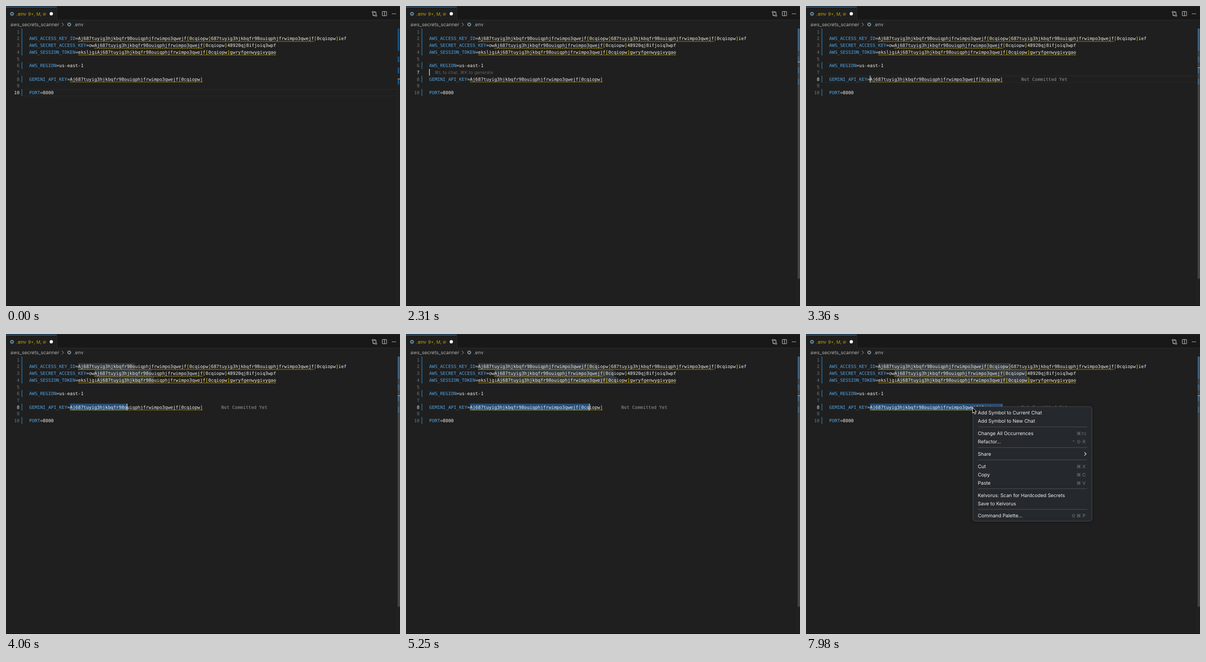
An HTML page for the animation above (8 s loop, 857 px wide and 653 px high).

```html
<!DOCTYPE html>
<html lang="en">
<head>
<meta charset="utf-8">
<title>Editor</title>
<style>
html, body { margin: 0; width: 100%; height: 100%; overflow: hidden; background: #1f1f1f; }
svg { display: block; width: 857px; height: 653px; }
text { white-space: pre; text-rendering: geometricPrecision; }
.mono { font: 9.8px "DejaVu Sans Mono", monospace; }
.ui { font: 10.5px Inter, "DejaVu Sans", sans-serif; }
.arial { font: 9.85px "Liberation Sans", "DejaVu Sans", sans-serif; }
</style>
</head>
<body>
<svg id="stage" viewBox="0 0 857 653" xmlns="http://www.w3.org/2000/svg"></svg>
<script>
const NS = 'http://www.w3.org/2000/svg';
const stage = document.getElementById('stage');
const LOOP = 8000, STEP = 70;
const X0 = 50.6, CH = 5.9, PITCH = 14.7, ZOOM = PITCH / 18;

const colX = c => X0 + c * CH;
const midY = n => 56.1 + PITCH * (n - 1);
const topY = n => midY(n) - 7.3;

function el(tag, attrs, parent = stage) {
  const e = document.createElementNS(NS, tag);
  for (const k in attrs) e.setAttribute(k, attrs[k]);
  parent.appendChild(e);
  return e;
}
const rect = (x, y, width, height, fill, parent, more) =>
  el('rect', { x, y, width, height, fill, ...more }, parent);
const stroke = (d, color, width, parent) =>
  el('path', { d, fill: 'none', stroke: color, 'stroke-width': width }, parent);
function label(x, y, str, fill, cls, parent, more) {
  const e = el('text', { x, y, fill, class: cls, ...more }, parent);
  e.textContent = str;
  return e;
}
const group = parent => el('g', {}, parent);
const show = (e, on) => e.setAttribute('visibility', on ? 'visible' : 'hidden');

const defs = el('defs', {});
const hatch = el('pattern', { id: 'hatch', width: 3, height: 3, patternUnits: 'userSpaceOnUse' }, defs);
stroke('M-1 1L1 -1M0 3L3 0M2 4L4 2', '#2488be', 1.1, hatch);
const wave = el('pattern', { id: 'wave', width: 6, height: 3, patternUnits: 'userSpaceOnUse' }, defs);
el('path', { d: 'M5.5 0L2.5 3H1.1L4.1 0ZM4 0L6 2V.6L5.4 0ZM0 2L1 3H2.4L0 .6Z', fill: '#cca700' }, wave);
const blur = el('filter', { id: 'blur', x: '-20%', y: '-20%', width: '140%', height: '140%' }, defs);
el('feGaussianBlur', { stdDeviation: 3 }, blur);

// Window chrome
rect(0, 0, 857, 653, '#1f1f1f');
rect(0, 0, 857, 30, '#181818');
rect(0, 30, 857, 1, '#2b2b2b');
rect(0, 1, 857, 1, '#2b2b2b');
rect(0, 2, 110, 29, '#1f1f1f');
rect(0, 1.7, 110, 1.3, '#1f76b4');
rect(110, 2, 1, 29, '#2b2b2b');
rect(0, 649, 857, 4, '#181818');
rect(0, 649, 857, 1, '#2b2b2b');

function gear(x, y, color) {
  const g = group();
  g.setAttribute('transform', `translate(${x} ${y})`);
  el('circle', { r: 2.6, fill: 'none', stroke: color, 'stroke-width': 1.5 }, g);
  for (let a = 0; a < 360; a += 45)
    rect(-0.85, -4.4, 1.7, 1.6, color, g, { transform: `rotate(${a})` });
}
const modified = '#c4a000';
gear(13, 17, '#6d97ae');
label(23, 20.8, '.env', '#cca700', 'ui');
label(48, 20.8, '9+, M,', modified, 'ui', stage, { style: 'font-size:9.7px' });
el('circle', { cx: 83.6, cy: 17.8, r: 2.5, fill: 'none', stroke: modified, 'stroke-width': 0.9 });
stroke('M81.9 19.5L85.3 16.1', modified, 0.9);
el('circle', { cx: 98.5, cy: 16.8, r: 3.6, fill: '#fff' });

const crumb = '#b0b0b0';
label(9.6, 44.2, 'aws_secrets_scanner', crumb, 'ui');
stroke('M121.6 36.6L125.4 40.4L121.6 44.2', crumb, 1);
gear(137.5, 40.2, '#6d97ae');
label(147.5, 44.2, '.env', crumb, 'ui');

// Compare, split and overflow buttons
const icon = '#d6d6d6';
el('circle', { cx: 798, cy: 13.2, r: 1.7, fill: 'none', stroke: icon });
el('circle', { cx: 804.8, cy: 20.8, r: 1.7, fill: 'none', stroke: icon });
stroke('M798 15V20.6H801.6M800 18.7L801.9 20.6L800 22.5M804.8 19V13.2H801.2M802.8 11.3L800.9 13.2L802.8 15.1', icon, 1);
rect(818.5, 12, 9.4, 9.2, 'none', stage, { stroke: icon, rx: 0.6 });
stroke('M823.2 12V21.2', icon, 1);
for (let i = 0; i < 3; i++) el('circle', { cx: 840.6 + i * 3.3, cy: 17, r: 0.9, fill: icon });

// Editor
const KEY = 'Aj687tuyig3hjkbqfr98ouiqphjfrwimpo3qwejf[0cqiopw]';
const lines = {
  2: ['AWS_ACCESS_KEY_ID', KEY + KEY.slice(2) + 'ief'],
  3: ['AWS_SECRET_ACCESS_KEY', 'ow' + KEY + '48920qj8ifjoiq3wpf'],
  4: ['AWS_SESSION_TOKEN', 'eksljgi' + KEY + 'gwryfgenwygivygao'],
  6: ['AWS_REGION', 'us-east-1'],
  8: ['GEMINI_API_KEY', KEY],
  10: ['PORT', '8000']
};
const squiggles = [[2, 18, 105], [3, 24, 64], [4, 18, 91], [8, 15, 64]];
const copies = [[2, 18], [3, 24], [4, 25]];

const rowMark = group();
rect(38, 0, 813.5, 1, '#2a2a2a', rowMark);
rect(38, PITCH - 0.2, 813.5, 1, '#2a2a2a', rowMark);

const copyBoxes = copies.map(([n, c]) =>
  rect(colX(c), topY(n), 0, PITCH, 'rgba(173,214,255,.15)'));
const sel = rect(0, topY(8), 0, PITCH, '#264f78');
const selEol = rect(X0, topY(7), CH, PITCH, '#264f78');

const numbers = [];
for (let n = 1; n <= 10; n++)
  numbers[n] = label(29.4, midY(n) + 3.6, n, '#6e7681', 'mono', stage, { 'text-anchor': 'end' });

[[1, 4], [6, 1], [8, 1], [10, 1]].forEach(([n, count]) =>
  rect(33.3, topY(n), 2.6, PITCH * count, 'url(#hatch)'));

const plain = '#efefef';
for (const n in lines) {
  const [name, value] = lines[n];
  const t = label(X0, midY(+n) + 3.6, '', plain, 'mono');
  const span = (str, fill) => { el('tspan', { fill }, t).textContent = str; };
  span(name, '#53a5e4');
  span('=', '#dcdcdc');
  value.split(/([\[\]])/).forEach(s => s && span(s, /[\[\]]/.test(s) ? '#ffd700' : plain));
}

for (const [n, a, b] of squiggles)
  rect(0, 0, (b - a) * CH / ZOOM, 3, 'url(#wave)', stage,
    { transform: `translate(${colX(a)} ${topY(n) + PITCH - 3 * ZOOM}) scale(${ZOOM})` });

const hint = label(62, midY(7) + 3.6, '⌘L to chat, ⌘K to generate', '#5f5f5f', 'ui', stage, { style: 'font-size:9.8px' });
const blame7 = label(colX(7), midY(7) + 3.6, 'folder rearrangment, tavormek (3 weeks ago)', '#979797', 'mono');
const blame8 = label(468.3, midY(8) + 3.6, 'Not Committed Yet', '#979797', 'mono');
const caret = rect(0, 0, 1.5, PITCH, '#d0d0cc');

// Overview ruler
rect(851, 49, 0.8, 600, '#2a2a2a');
[[49, 48.5], [110, 12.3], [134, 12.5], [158.5, 12.5]].forEach(([y, h]) =>
  rect(852, y, 3.6, h, '#174f80'));
const slider = rect(852, 49, 5, 544.5, 'rgba(121,121,121,.4)');
const rulerMark = rect(852, 0, 5, 1.4, '#a8a8a8');

// Selection toolbar
const bar = group();
rect(170.5, 124.5, 149, 20.5, '#1f1f1f', bar, { rx: 4, stroke: '#454545' });
label(177.7, 138, 'Add to Chat', '#f0f0f0', 'arial', bar);
label(231.5, 137.6, '⌘L', '#777', 'arial', bar, { style: 'font-size:7.6px' });
label(253.7, 138, 'Quick Edit', '#f0f0f0', 'arial', bar);
label(301, 137.6, '⌘K', '#777', 'arial', bar, { style: 'font-size:7.6px' });

// Context menu
const menu = group();
rect(363, 160, 259, 249, '#000', menu, { rx: 5, opacity: 0.4, filter: 'url(#blur)' });
rect(363, 158, 259, 249.4, '#25282c', menu, { rx: 5, stroke: '#484a4d' });
[202.2, 247.2, 274, 336.8, 381.7].forEach(y => rect(374, y - 0.5, 237.5, 1, '#505356', menu));
[
  [171, 'Add Symbol to Current Chat'],
  [189, 'Add Symbol to New Chat'],
  [216, 'Change All Occurrences', '⌘', 'F2'],
  [234, 'Refactor...', '^', '⇧', 'R'],
  [261, 'Share'],
  [288, 'Cut', '⌘', 'X'],
  [306, 'Copy', '⌘', 'C'],
  [324, 'Paste', '⌘', 'V'],
  [351, 'Kelvorus: Scan for Hardcoded Secrets'],
  [369, 'Save to Kelvorus'],
  [395.7, 'Command Palette...', '⇧', '⌘', 'P']
].forEach(([y, str, ...keys]) => {
  label(373.8, y + 3.7, str, '#f2f2f2', 'ui', menu);
  keys.reverse().forEach((k, i) => label(604.6 - i * 11.3, y + 3.7, k, '#7a7c7e', 'ui', menu,
    { 'text-anchor': 'middle', style: k === 'F2' ? 'font-size:8px' : 'font-size:10px' }));
});
stroke('M605.6 257.3L609.3 261L605.6 264.7', '#f2f2f2', 1.2, menu);

const pointer = el('path', {
  d: 'M362.3 160V172.4L365.2 169.8L367.2 174.3L369.4 173.3L367.4 169H371Z',
  fill: '#000', stroke: '#fff', 'stroke-width': 1, 'stroke-linejoin': 'round'
});

// Characters selected to the right of the anchor
function dragCount(t) {
  if (t < 3430) return 0;
  if (t < 4550) return Math.round((t - 3360) / STEP * 2.1);
  if (t < 4900) return 0;
  if (t < 5250) return Math.min(43, Math.round(36 + (t - 4900) / STEP * 2.4));
  if (t < 5390) return 44 + (t - 5250) / STEP;
  if (t < 5530) return 46;
  if (t < 5670) return 47;
  return t < 5740 ? 48 : 49;
}

function caretOn(t) {
  if (t < 2310) return false;
  if (t < 3220) return t < 2800;
  return t < 6300 || (t >= 6790 && t < 7350);
}

function draw(ms) {
  const t = Math.floor(ms / STEP + 1e-6) * STEP;
  const upper = t >= 4550 && t < 4900;
  const row = t < 2310 ? 10 : t < 3220 || upper ? 7 : 8;
  const count = dragCount(t);
  const col = row === 8 ? 15 + count : 0;

  numbers.forEach((e, n) => e.setAttribute('fill', n === row ? '#e8e8e8' : '#6e7681'));
  rowMark.setAttribute('transform', `translate(0 ${topY(row) - 0.3})`);
  show(rowMark, !upper && !count && t !== 2310);

  sel.setAttribute('x', upper ? X0 : colX(15));
  sel.setAttribute('width', (upper ? 15 : count) * CH);
  show(selEol, upper);
  copyBoxes.forEach(b => b.setAttribute('width', count > 1 ? count * CH : 0));

  show(hint, row === 7 && !upper);
  show(blame7, upper);
  show(blame8, row === 8);
  caret.setAttribute('x', colX(col) - 0.4);
  caret.setAttribute('y', topY(row));
  show(caret, caretOn(t));

  show(slider, t >= 2310);
  rulerMark.setAttribute('y', { 10: 158, 7: 121.4, 8: 133.6 }[row]);

  show(bar, t >= 6230 && t < 7490);
  show(menu, t >= 7490);
  menu.setAttribute('opacity', Math.max(0, Math.min(1, (t - 7450) / 83)));
  show(pointer, t >= 7980);
}

function tick() {
  draw(performance.now() % LOOP);
  requestAnimationFrame(tick);
}
tick();
</script>
</body>
</html>
```
